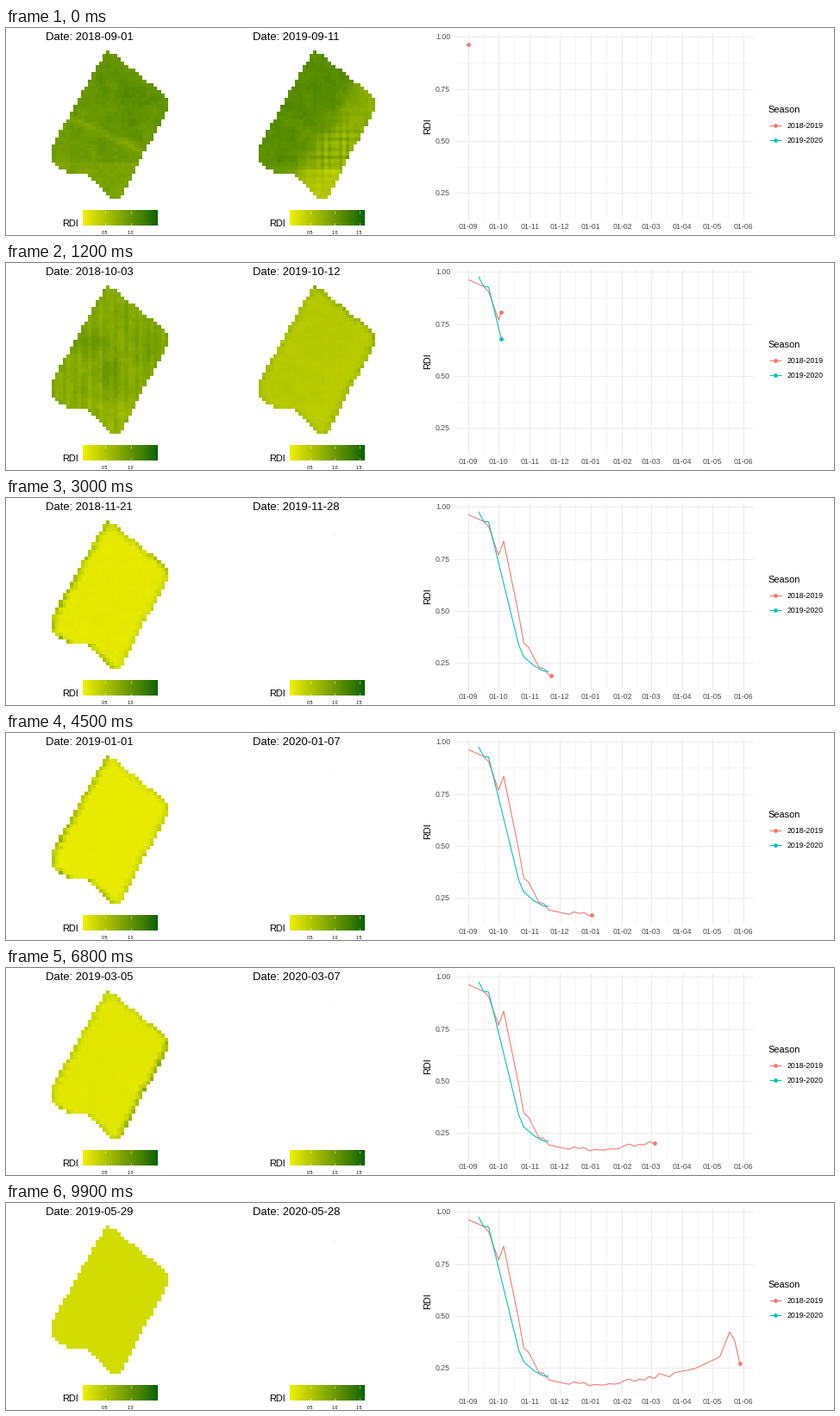
These frames come from a looping animation (960x240 px, 10 s). A matplotlib script:

```python
import numpy as np
import matplotlib.pyplot as plt
from matplotlib.animation import FuncAnimation
from matplotlib.colors import LinearSegmentedColormap
from matplotlib.path import Path

W, H, FRAMES = 960, 240, 100
PX = 0.72  # points per pixel at 100 dpi
RED, TEAL = "#F8766D", "#00BFC4"
ROWS, COLS, CELL = 41, 32, 4.19

plt.rcParams["font.family"] = "Liberation Sans"
fig = plt.figure(figsize=(W / 100, H / 100), dpi=100, facecolor="white")
ax = fig.add_axes([0, 0, 1, 1])


# Yellow to dark green, blended in CIELAB
M = np.array([[.4124, .3576, .1805], [.2126, .7152, .0722], [.0193, .1192, .9505]])
WHITE = M.sum(axis=1)


def rgb_to_lab(c):
    c = np.asarray(c) / 255
    lin = np.where(c > .04045, ((c + .055) / 1.055) ** 2.4, c / 12.92)
    t = M @ lin / WHITE
    f = np.where(t > .008856, np.cbrt(t), 7.787 * t + 16 / 116)
    return np.array([116 * f[1] - 16, 500 * (f[0] - f[1]), 200 * (f[1] - f[2])])


def lab_to_rgb(lab):
    fy = (lab[0] + 16) / 116
    f = np.array([fy + lab[1] / 500, fy, fy - lab[2] / 200])
    t = np.where(f > .2069, f ** 3, (f - 16 / 116) / 7.787)
    lin = np.clip(np.linalg.inv(M) @ (t * WHITE), 0, 1)
    return np.where(lin > .0031308, 1.055 * lin ** (1 / 2.4) - .055, 12.92 * lin)


lab0, lab1 = rgb_to_lab([240, 240, 0]), rgb_to_lab([0, 100, 0])
cmap = LinearSegmentedColormap.from_list(
    "rdi", [np.clip(lab_to_rgb(lab0 + (lab1 - lab0) * t), 0, 1)
            for t in np.linspace(0, 1, 64)], N=256)

# Mean index per satellite pass; steps are five days from 1 September
red_k = np.array([0, 3, 4, 6, 7, 10, 11, 12, 14, 15, 16, 20, 21, 22, 23, 24, 25, 27,
                  28, 29, 30, 31, 32, 33, 34, 35, 36, 37, 38, 40, 41, 45, 50, 52, 53, 54])
red_v = np.array([.962, .930, .905, .768, .835, .483, .346, .325, .230, .223, .193,
                  .172, .184, .176, .181, .165, .171, .168, .175, .173, .176, .190,
                  .197, .187, .196, .193, .209, .200, .224, .208, .228, .247, .303,
                  .423, .381, .274])
teal_k = np.array([2, 3, 4, 10, 11, 13, 14, 15, 16])
teal_v = np.array([.977, .930, .927, .337, .280, .238, .224, .212, .211])

# Field shape on the cell grid
row, col = np.mgrid[:ROWS, :COLS]
cx, cy = 53 + CELL * (col + .5), 26 + CELL * (row + .5)
outline = Path([(116, 25), (118.5, 26), (187.5, 81), (187.5, 92), (132, 198.5),
                (123, 198.5), (95, 168.5), (78, 168.5), (64, 164), (52.5, 152.5),
                (52.5, 138.5)])
mask = outline.contains_points(np.c_[cx.ravel(), cy.ravel()]).reshape(ROWS, COLS)


def border(dr, dc):
    """Weight of cells lying next to the outline in one direction."""
    pad = np.pad(mask, 2)
    out = np.zeros((ROWS, COLS))
    for n, w in ((1, .65), (2, .35)):
        r, c = 2 + dr * n, 2 + dc * n
        out += w * ~pad[r:r + ROWS, c:c + COLS]
    return out * mask


west = border(0, -1)
north = border(-1, 0) * (col >= 15)
east = border(0, 1) * (row >= 14)


def noise(seed, blur):
    a = np.random.default_rng(seed).normal(size=(ROWS, COLS))
    for _ in range(blur):
        a = (2 * a + sum(np.roll(a, s, i) for s in (-1, 1) for i in (0, 1))) / 6
    return a / a.std()


def blob(x, y, rx, ry):
    return np.exp(-((cx - x) / rx) ** 2 - ((cy - y) / ry) ** 2)


band = np.exp(-((cy - 105 - .48 * (cx - 78)) / 5) ** 2)
furrows = (.09 * blob(150, 85, 35, 35) + .05 * blob(120, 55, 25, 30) - .13 * band
           - .10 * (cy > 155) - .05 * (cx < 75))
patches = (.22 * blob(98, 92, 18, 14) + .20 * blob(120, 128, 12, 25)
           + .12 * blob(165, 95, 22, 25) - .12 * blob(125, 180, 30, 22)
           + .06 * np.cos(2.2 * col))
slope = 1 / (1 + np.exp(-((cx - 120) * .85 + (cy - 135) * .55) / 7))
stripes = (-.38 * slope - .2 * (cy > 165) * slope
           + .15 * slope * blob(135, 138, 40, 32) * (np.cos(2.6 * row) + np.cos(2.6 * col)))


def build(ks, vs, keys, w, n, e, amp, textures, seed):
    """One field per pass, each with the given mean."""
    wobble = 1 + .3 * noise(seed, 0)
    fields = []
    for k, v in zip(ks, vs):
        def at(ys):
            return np.interp(k, keys, ys)
        f = (at(w) * west + at(n) * north + at(e) * east) * wobble
        f = f + at(amp) * (.6 * noise(seed + k, 2) + .4 * noise(seed + 99 + k, 0))
        for tex, weights in textures:
            f = f + at(weights) * tex
        fields.append(v + f - f[mask].mean())
    return np.array(fields)


left = build(red_k, red_v, [0, 4, 7, 11, 24, 37, 45, 53, 54],
             [0, 0, .05, .35, .38, .18, .22, .15, 0],
             [0, 0, .05, .38, .15, .18, .38, .15, 0],
             [0, 0, 0, .12, .18, .42, .15, .15, 0],
             [.045, .05, .06, .012, .006, .006, .01, .015, 0],
             [(furrows, [1, .4, 0, 0, 0, 0, 0, 0, 0]),
              (patches, [0, .4, 1, 0, 0, 0, 0, 0, 0])], 20)
right = build(teal_k, teal_v, [2, 3, 4, 10, 13, 16],
              [0, 0, 0, .18, .18, .18], [0, 0, 0, .28, .32, .28], [0, 0, 0, .2, .24, .2],
              [.04, .04, .04, .015, .008, .006],
              [(stripes, [1, .5, .2, 0, 0, 0]),
               (furrows, [.4, .3, .2, 0, 0, 0])], 300)


def blend(ks, fields, k):
    i = min(np.searchsorted(ks, k, side="right") - 1, len(ks) - 2)
    t = (k - ks[i]) / (ks[i + 1] - ks[i])
    return np.ma.array(fields[i] * (1 - t) + fields[i + 1] * t, mask=~mask)


def text(x, y, s, size, color="black", ha="left", va="baseline", **kw):
    return ax.text(x, y, s, fontsize=size * PX, color=color, ha=ha, va=va, **kw)


def line(xs, ys, color, width, z=2):
    return ax.plot(xs, ys, color=color, lw=width * PX, zorder=z,
                   solid_capstyle="butt")[0]


def dot(x, y, color):
    return ax.plot([x], [y], "o", color=color, ms=4.8 * PX, mew=0, zorder=5)[0]


def map_panel(dx, lo, hi, ticks):
    img = ax.imshow(np.ma.masked_all((ROWS, COLS)), cmap=cmap, vmin=lo, vmax=hi,
                    aspect="auto", interpolation="nearest", zorder=2,
                    extent=(53 + dx, 53 + dx + CELL * COLS, 26 + CELL * ROWS, 26))
    x0, x1 = 89.2 + dx, 175.6 + dx
    ax.imshow(np.linspace(0, 1, 300)[None], cmap=cmap, aspect="auto",
              extent=(x0, x1, 229.5, 212), zorder=2)
    for v in ticks:
        x = x0 + (v - lo) / (hi - lo) * (x1 - x0)
        line([x, x], [212, 215.4], "white", .5, 3)
        line([x, x], [226.1, 229.5], "white", .5, 3)
        text(x, 239, f"{v:.1f}", 5.2, ha="center")
    text(65 + dx, 230, "RDI", 11)
    return img, text(46 + dx, 14, "", 13)


img_l, title_l = map_panel(0, .078, 1.518, (.5, 1))
img_r, title_r = map_panel(240, .088, 1.603, (.5, 1, 1.5))
line([381.4, 382.4], [42.5, 42.5], "#dddddd", 1, 1)


# Chart
def px(day):
    return 536.2 + 1.165 * day


def py(v):
    return 10.2 + (1 - v) * 241.6


months = [0, 30, 61, 91, 122, 153, 182, 213, 243, 274]
for i, d in enumerate(months):
    line([px(d)] * 2, [5.5, 221.5], "#EBEBEB", 1.07, 1)
    text(px(d), 233, f"01-{(8 + i) % 12 + 1:02d}", 8.8, "#4D4D4D", "center")
for a, b in zip(months, months[1:]):
    line([px((a + b) / 2)] * 2, [5.5, 221.5], "#EBEBEB", .55, 1)
for v in (.25, .5, .75, 1):
    line([520.3, 866.3], [py(v)] * 2, "#EBEBEB", 1.07, 1)
    text(515, py(v) + 3, f"{v:.2f}", 8.8, "#4D4D4D", "right")
for v in (.375, .625, .875):
    line([520.3, 866.3], [py(v)] * 2, "#EBEBEB", .55, 1)
text(489.5, 114, "RDI", 11, ha="center", va="center", rotation=90)

text(883, 98, "Season", 11)
for y, c, s in ((113, RED, "2018-2019"), (130, TEAL, "2019-2020")):
    line([885, 899], [y, y], c, 1.07)
    dot(892, y, c)
    text(906, y + 3, s, 8.8)

series = [(ks, vs, line([], [], c, 1.07, 4), dot(0, 0, c))
          for ks, vs, c in ((red_k, red_v, RED), (teal_k, teal_v, TEAL))]

ax.set_xlim(0, W)
ax.set_ylim(H, 0)
ax.axis("off")


def draw(i):
    t = i / (FRAMES - 1)
    for title, start, span in ((title_l, "2018-09-01", 270),
                               (title_r, "2019-09-11", 260)):
        title.set_text(f"Date: {np.datetime64(start) + int(span * t + 1e-9)}")

    img_l.set_data(blend(red_k, left, 54 * t))
    k = 2 + 52 * t
    img_r.set_visible(bool(k <= teal_k[-1]))
    if k <= teal_k[-1]:
        img_r.set_data(blend(teal_k, right, k))

    k = 54 * t
    for ks, vs, path, head in series:
        seen = ks <= k
        alive = ks[0] <= k <= ks[-1] + 1e-9
        xs, ys = ks[seen], vs[seen]
        if alive:
            now = np.interp(k, ks, vs)
            xs, ys = np.append(xs, k), np.append(ys, now)
            head.set_data([px(5 * k)], [py(now)])
        head.set_visible(bool(alive))
        path.set_data(px(5 * xs), py(ys))
    return []


anim = FuncAnimation(fig, draw, frames=FRAMES, interval=100, repeat=True, blit=False)
plt.show()
```
